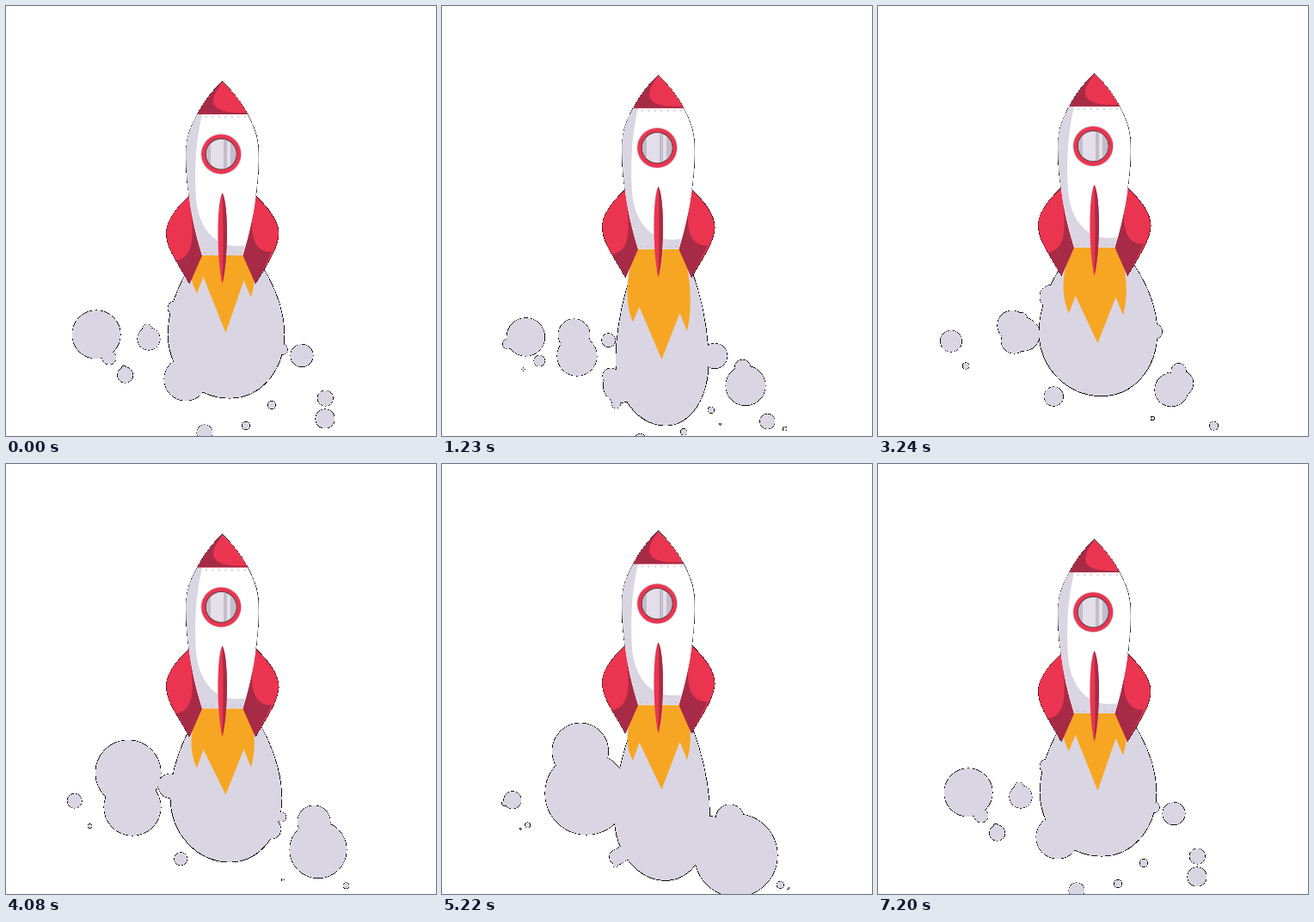
Write an HTML page that moves like this. It is 500 px wide and 500 px high and loops after 7230 ms.

```html
<!DOCTYPE html>
<html lang="en">
<head>
<meta charset="utf-8">
<title>Rocket</title>
<style>
html, body { margin: 0; width: 100%; height: 100%; overflow: hidden; background: #fff; }
svg { display: block; width: 100vw; height: 100vh; }
.line { stroke: #111; stroke-width: 1.1; }
.crisp { shape-rendering: crispEdges; }
.red { fill: #eb3550; }
.dark { fill: #a72b46; }
.shade { fill: #dad5e2; }
</style>
</head>
<body>
<svg viewBox="0 0 500 500">
  <path id="smokeEdge" class="line crisp shade"/>
  <path id="smoke" class="crisp shade"/>
  <path id="flame" fill="#f6a623"/>
  <g id="rocket">
    <path class="line crisp" fill="none" d="M213.500 313C201 290 187 273 186.500 255C186 239 199 224 213 211Q209.500 189 209.500 168C209 146 212 136 222.500 116Q234 94 251.500 78Q269 94 281 116C291 136 294 146 293.800 168Q293.500 189 290.500 211C304 224 317 239 317 255C316 273 303 290 290 313"/>
    <path class="red" d="M213 211C199 224 186 239 186.500 255C187 273 201 290 213.500 313L228 280Q216 243 213 211Z"/>
    <path class="dark" d="M215 228C218 258 219 282 198 286L213.500 313L228 280Q219 253 215 228Z"/>
    <path class="red" d="M290.500 211C304 224 317 239 317 255C316 273 303 290 290 313L275.500 280Q287 243 290.500 211Z"/>
    <path class="dark" d="M288 228C283 252 287 277 309 276L290 313L275.500 280Q284 253 288 228Z"/>
    <path fill="#fff" d="M251.500 78Q234 94 222.500 116C212 136 209 146 209.500 168C210 212 220 252 228 280H275.500C284 252 293 212 293.800 168C294 146 291 136 281 116Q269 94 251.500 78Z"/>
    <path class="shade" d="M222.500 116H228C220 150 219 184 221 214C224 250 245 274 278 268L275.500 280H228C220 252 210 212 209.500 168C209 146 212 136 222.500 116Z"/>
    <path class="red" d="M251.500 78Q234 94 222.500 116H281Q269 94 251.500 78Z"/>
    <path class="dark" d="M251.500 78Q234 94 222.500 116H281L280 114C255 115 242 111 241 101C241 93 246 87 251.500 78Z"/>
    <path d="M232 119H279M231 277H244M264 277H274" stroke="#bdb5c6" stroke-width="1.600" stroke-dasharray="1.600 5.900"/>
    <circle cx="250.200" cy="162.200" r="24" fill="#dcd7e2"/>
    <circle cx="250.200" cy="162.200" r="23" class="red"/>
    <circle cx="250.200" cy="162.200" r="18.500" fill="#66404e"/>
    <clipPath id="glass"><circle cx="250.200" cy="162.200" r="17.300"/></clipPath>
    <g clip-path="url(#glass)">
      <path fill="#e4dfe8" d="M230 140h40v45h-40z"/>
      <path fill="#c3bccb" d="M230 140h8v45h-8zM253 140h4v45h-4zM261 140h9v45h-9z"/>
    </g>
    <path class="red" d="M251.500 207C244.500 220 245 286 251.500 313C258.500 286 259 220 251.500 207Z"/>
    <path class="dark" d="M251.500 207C253 235 253 285 251.500 313C258.500 286 259 220 251.500 207Z"/>
  </g>
</svg>
<script>
const STEP = 30, LOOP = 7230, FRAMES = 240, BURN = 80;
const BOB_END = 225, BOB = BOB_END / 7, AXIS = 255;
const $ = id => document.getElementById(id);
const clamp = v => Math.max(0, Math.min(1, v));
const random = n => { const v = Math.sin(n * 127.1 + 3.7) * 43758.5453; return v - Math.floor(v); };

// Swelling clouds: peak time, x, y, radius, size of the lobe on top.
const CLOUDS = [
  [0, 166, 387, 13, 0.4], [41, 157, 407, 23, 0.8], [80, 180, 372, 43, 0.4],
  [136, 147, 399, 33, 1.15], [174, 168, 383, 48, 0.68], [214, 149, 420, 18, 0.3]
];
// Bubbles that shrink as they drift: x, y, radius at the start.
const BUBBLES = [
  [105, 382, 28], [120, 409, 8], [209, 434, 25], [309, 464, 4.5],
  [279, 488, 4.5], [231, 496, 9], [371, 480, 11]
];
// Each pass of the bubbles: birth, progress at birth, speed.
const PASSES = [[-18, -0.1, 0.0055], [160, 0.57, 0.008], [17, 0.63, 0.009]];
const KNOBS = 18;

const circle = (x, y, r) => r < 0.4 ? "" :
  `M${x - r} ${y}a${r} ${r} 0 0 1 ${2 * r} 0a${r} ${r} 0 0 1 ${-2 * r} 0Z`;

// Frames from a peak, by the shorter way round the loop.
const offset = (frame, peak) => (frame - peak + FRAMES * 1.5) % FRAMES - FRAMES / 2;
const swell = (dt, life) => Math.pow(clamp(1 - Math.abs(dt) / life), 0.6);

function plume(frame) {
  const p = frame / BURN * 2 * Math.PI;
  const b = 472 - 16 * Math.cos(3 * p) - 4 * Math.sin(p), w = 68 - (b - 455) * 0.43, y = b - 74;
  return `M256 250C295 290 ${256 + w} ${y - 45} ${256 + w} ${y}` +
    `C${256 + w} ${y + 41} ${260 + w * 0.55} ${b} 260 ${b}` +
    `C${260 - w * 0.58} ${b} ${256 - w} ${y + 41} ${256 - w} ${y}` +
    `C${256 - w} ${y - 45} 217 290 256 250Z`;
}

function bubbles(frame) {
  let d = "";
  for (const [birth, start, speed] of PASSES) {
    const age = (frame - birth + FRAMES) % FRAMES, s = start + age * speed;
    if (s > 1.06) continue;
    const size = clamp(age / 14) * (0.06 + 0.94 * clamp(1 - s));
    for (const [x, y, r] of BUBBLES) {
      const side = x - 240;
      d += circle(x + side * 0.25 * s, y + (40 - Math.abs(side) * 0.2) * s, r * size);
    }
  }
  return d;
}

// Every cloud has a lower twin on the other side of the plume.
function clouds(frame) {
  let d = "";
  for (const [peak, x, y, radius, lobe] of CLOUDS) {
    const dt = offset(frame, peak), r = radius * swell(dt, 38);
    for (const side of [-1, 1]) {
      const right = side > 0, ratio = right ? lobe / 2 : lobe;
      const cx = AXIS + side * (AXIS - x + 0.4 * dt);
      const cy = y + 0.35 * dt + (right ? 1.5 * radius : 0);
      d += circle(cx, cy, r) + circle(cx - 0.15 * r, cy - r * (0.75 + 0.4 * ratio), r * ratio);
    }
  }
  return d;
}

// Small puffs pushing out of the plume's edge.
function knobs(frame) {
  let d = "";
  for (let i = 0; i < KNOBS; i++) {
    const dt = offset(frame, i * FRAMES / KNOBS), side = i % 2 ? 1 : -1;
    const y = 335 + 115 * random(i), reach = 64 * Math.sqrt(1 - ((y - 385) / 85) ** 2);
    d += circle(AXIS + side * (reach + 0.2 * dt), y + 0.3 * dt, (8 + 9 * random(i + 50)) * swell(dt, 24));
  }
  return d;
}

function flame(frame) {
  const u = frame % BURN / BURN;
  const stretch = 1 - Math.abs(1 - 2 * u), pull = Math.sin(2 * Math.PI * u) ** 2;
  const at = (rest, grow, lag) => rest + grow * stretch - lag * pull;
  const left = at(334, 34, 1), right = at(339, 40, 11);
  return `M232 270C211 305 213 ${left - 18} 222 ${left}L229.500 ${at(315, 36, 5)}` +
    `L255.500 ${at(380, 32, 16)}L276.500 ${at(319, 39, 12)}L285 ${right}` +
    `C291 ${right - 22} 292 305 273 270Z`;
}

// The rocket dips seven times, then rests at the low point.
const bob = frame => 10 * Math.abs(Math.cos(Math.PI * Math.min(frame, BOB_END) / BOB)) ** 3;

function draw(ms) {
  const frame = Math.floor(ms % LOOP / STEP);
  const d = plume(frame) + bubbles(frame) + clouds(frame) + knobs(frame);
  $("smokeEdge").setAttribute("d", d);
  $("smoke").setAttribute("d", d);
  $("flame").setAttribute("d", flame(frame));
  $("rocket").setAttribute("transform", `translate(0 ${bob(frame)})`);
}

const begin = performance.now();
function tick() {
  draw(performance.now() - begin);
  requestAnimationFrame(tick);
}
tick();
</script>
</body>
</html>
```
